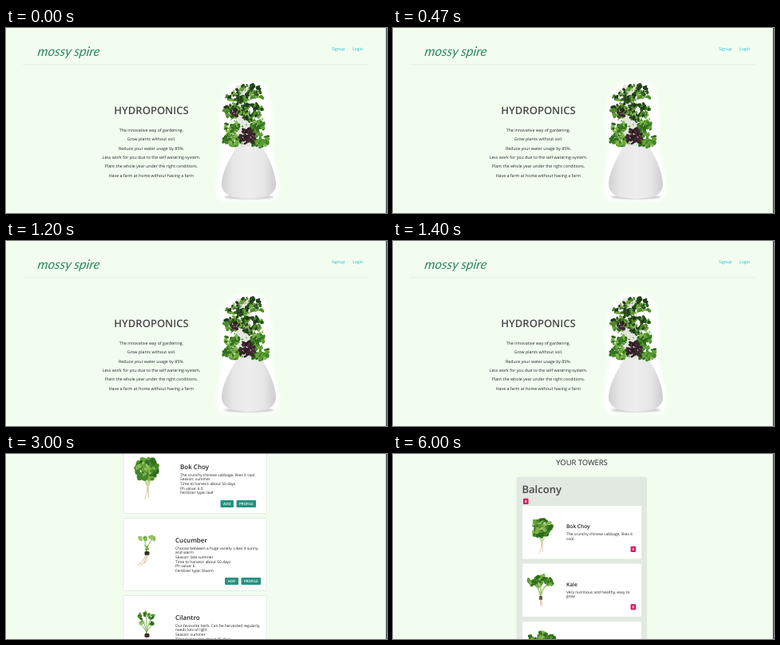
Write an HTML page that moves like this. It is 477 by 232 pixels and loops after 8.99 s.

```html
<!DOCTYPE html>
<html lang="en">
<head>
<meta charset="utf-8">
<title>Hydroponics</title>
<style>
  html, body { margin: 0; width: 100%; height: 100%; overflow: hidden; background: #f2fdf0; }
  svg { display: block; width: 100%; height: 100%; }
  text { font-family: "Open Sans", "Noto Sans", sans-serif; text-rendering: geometricPrecision; }
  .logo { font: italic 400 16.4px Lato, sans-serif; }
</style>
</head>
<body>
<svg id="stage" viewBox="0 0 477 232" preserveAspectRatio="none"></svg>
<script>
const LOOP = 8990;
const SCREEN_STARTS = [0, 3000, 6000];
const GREENS = ["#2f6b1c", "#44862a", "#62a136", "#7fb54a", "#33701f"];
const DEEP = ["#24481a", "#345f22", "#4d8a2c", "#6fa53e", "#1f3a18"];
const PALE = ["#9cc66b", "#79b04a", "#5b9437", "#8abb58"];
const PURPLES = ["#2e1a26", "#46243a", "#3a2a2a"];

let seed = 11;
function random() {
  seed = (seed * 1664525 + 1013904223) % 4294967296;
  return seed / 4294967296;
}

function text(x, y, size, content, { fill = "#222", weight = 400, anchor = "start" } = {}) {
  return `<text x="${x}" y="${y}" font-size="${size}" fill="${fill}" font-weight="${weight}" text-anchor="${anchor}">${content}</text>`;
}

function rect(x, y, w, h, fill, extra = "") {
  return `<rect x="${x}" y="${y}" width="${w}" height="${h}" fill="${fill}" ${extra}/>`;
}

function stroke(d, color, width) {
  return `<path d="${d}" fill="none" stroke="${color}" stroke-width="${width}" stroke-linecap="round"/>`;
}

function lines(x, y, size, step, rows, style) {
  return rows.map((row, i) => text(x, y + i * step, size, row, style)).join("");
}

// Leaves scattered evenly over an ellipse
function foliage(cx, cy, rx, ry, count, size, colors) {
  let out = "";
  for (let i = 0; i < count; i++) {
    const angle = random() * Math.PI * 2;
    const radius = Math.sqrt(random());
    const x = (cx + Math.cos(angle) * radius * rx).toFixed(1);
    const y = (cy + Math.sin(angle) * radius * ry).toFixed(1);
    const length = size * (0.7 + random() * 0.6);
    const color = colors[Math.floor(random() * colors.length)];
    out += `<ellipse cx="${x}" cy="${y}" rx="${length.toFixed(1)}" ry="${(length * 0.6).toFixed(1)}"
      fill="${color}" transform="rotate(${Math.round(random() * 180)} ${x} ${y})"/>`;
  }
  return out;
}

function bokChoy(x, y, scale) {
  return `<g transform="translate(${x} ${y}) scale(${scale})">`
    + stroke("M0 27Q-3 33-4 36M0 27Q2 32 1 35", "#cfb48c", 0.7)
    + stroke("M-6 6L-1 19M6 6L1 19M0 6V24", "#c5dda0", 2.4)
    + stroke("M0 17V27", "#ddd3ad", 3)
    + foliage(-1, -1, 14, 12, 60, 4.4, GREENS)
    + foliage(-2, -3, 11, 8, 12, 2.4, PALE) + "</g>";
}

function cucumber(x, y) {
  return `<g transform="translate(${x} ${y})">`
    + stroke("M0 19Q-1 8-3 3M0 18Q2 8 7 3", "#8ab45c", 1)
    + foliage(-5, 2, 5, 2, 7, 3, PALE) + foliage(7, 1, 4, 1.5, 6, 2.8, PALE)
    + foliage(1, 13, 3, 3, 4, 1.8, PALE)
    + rect(-2.5, 18, 6, 5, "#3b2d23", 'rx="1.5"')
    + stroke("M-1 23Q-4 32-11 35M0 23Q-2 34-8 36M1 23Q1 30-3 33", "#d8bd98", 0.9) + "</g>";
}

function cilantro(x, y) {
  return `<g transform="translate(${x} ${y})">`
    + stroke("M0 27Q-2 12-7 6M0 27Q2 12 7 5M0 27V3M0 24L-7 14M0 24L8 14", "#78a850", 0.9)
    + foliage(-6, 5, 4, 3, 8, 2.2, GREENS) + foliage(6, 4, 4, 3, 8, 2.2, GREENS)
    + foliage(0, 2, 3, 3, 6, 2, GREENS) + foliage(-6, 14, 3, 2, 6, 2, PALE)
    + foliage(7, 14, 3, 2, 6, 2, GREENS)
    + rect(-2.5, 26, 6, 5, "#3b2d23", 'rx="1.5"')
    + stroke("M0 31L-2 38M1 31L2 38", "#d8bd98", 0.9) + "</g>";
}

function kale(x, y) {
  return `<g transform="translate(${x} ${y})">`
    + stroke("M0 21Q-3 8-11 2M0 21Q2 8 11 4M0 22V2", "#9dc878", 1.5)
    + foliage(-9, 2, 7, 4, 18, 3, GREENS) + foliage(9, 3, 7, 4, 18, 3, GREENS)
    + foliage(0, -1, 7, 4, 15, 3, GREENS) + foliage(0, 7, 6, 3, 7, 2.2, PALE)
    + rect(-2, 20, 4, 5, "#6d5640", 'rx="1"')
    + stroke("M0 25Q-1 29 0 33M0 25L2 31", "#cfb48c", 0.9) + "</g>";
}

function vase() {
  return `<g filter="url(#glow)">`
    + `<path d="M286 68Q322 62 328 80Q336 110 332 150L342 195Q343 216 330 217H272Q262 214 264 192L271 150Q262 110 273 82Z" fill="#fff"/></g>`
    + `<ellipse cx="304" cy="212" rx="31" ry="2.6" fill="#c3c7c3" filter="url(#shade)"/>`
    + rect(288, 72, 18, 76, "#e3e6de")
    + `<path d="M289 148C284 158 271 176 270 196Q270 207 284 212Q304 216 324 212Q338 207 338 196C337 176 326 158 320 148Z" fill="url(#porcelain)"/>`
    + foliage(305, 77, 16, 6, 36, 2.6, DEEP)
    + foliage(298, 87, 23, 6, 50, 2.6, DEEP)
    + foliage(285, 104, 12, 9, 48, 2.7, DEEP)
    + foliage(307, 105, 14, 12, 64, 2.7, DEEP)
    + foliage(283, 124, 9, 8, 36, 2.7, GREENS)
    + foliage(315, 125, 9, 10, 44, 2.7, GREENS)
    + foliage(284, 140, 12, 8, 50, 2.7, GREENS)
    + foliage(318, 141, 12, 8, 50, 2.7, GREENS)
    + foliage(300, 85, 18, 10, 18, 1.6, PALE)
    + foliage(300, 122, 24, 24, 36, 1.6, PALE)
    + foliage(287, 108, 7, 5, 12, 2, PURPLES)
    + foliage(302, 136, 10, 10, 44, 2.5, PURPLES);
}

function landingScreen() {
  const link = { fill: "#10b5d8" };
  return `<text class="logo" fill="#2b8a60" transform="translate(39 34.5) skewX(-9)">mossy spire</text>`
    + text(408, 28.2, 5.1, "Signup", link) + text(434, 28.2, 5.1, "Login", link)
    + rect(21, 45.5, 432, 1, "#e5f0e4")
    + text(182, 108.3, 13, "HYDROPONICS", { fill: "#484848", weight: 600, anchor: "middle" })
    + lines(182, 129.9, 5.25, 11.35, [
      "The innovative way of gardening.",
      "Grow plants without soil.",
      "Reduce your water usage by 85%.",
      "Less work for you due to the self watering-system.",
      "Plant the whole year under the right conditions.",
      "Have a farm at home without having a farm"
    ], { anchor: "middle" })
    + vase();
}

function button(x, y, width, label) {
  return rect(x, y, width, 9, "#26927f", 'rx="1"')
    + text(x + width / 2, y + 6.1, 4.4, label, { fill: "#fff", weight: 600, anchor: "middle" });
}

function plantCard(top, height, x, title, rows) {
  return rect(147, top, 179, height, "#fff", 'stroke="#dfe9de" stroke-width=".8" rx="1"')
    + text(x, top + 30, 8, title, { weight: 600 })
    + lines(x, top + 39.2, 4.85, 5.65, rows);
}

function catalogScreen() {
  return plantCard(-11.5, 86, 218, "Bok Choy", [
      "The crunchy chinese cabbage, likes it cool.", "Season: summer",
      "Time to harvest: about 50 days", "Ph value: 6.5", "Fertilizer type: leaf"])
    + button(268.5, 58, 16.5, "ADD") + button(288.5, 58, 24.5, "PROFILE")
    + bokChoy(177.5, 20, 1)
    + plantCard(80.5, 91, 212, "Cucumber", [
      "Choose between a huge variety. Likes it sunny", "and warm", "Season: late summer",
      "Time to harvest: about 50 days", "Ph value: 6", "Fertilizer type: bloom"])
    + button(274, 155, 17, "ADD") + button(294.5, 155, 24.5, "PROFILE")
    + cucumber(176, 104)
    + plantCard(177.5, 91, 212, "Cilantro", [
      "Our favourite herb. Can be harvested regularly,", "needs lots of light",
      "Season: summer", "Time to harvest: about 25 days"])
    + cilantro(176, 199);
}

function badge(x, y) {
  return rect(x, y, 6.6, 7.2, "#dc1a63", 'rx="1.2"')
    + rect(x + 2.3, y + 2, 2, 3.2, "#f6c3d6", 'rx=".4"');
}

function towerCard(top, title, rows) {
  return rect(162, top, 149, 66.5, "#fff", 'rx="1"')
    + text(217, top + 28.4, 6.6, title, { weight: 600 })
    + lines(217, top + 37, 4.85, 5.6, rows)
    + badge(297.5, top + 50.7);
}

function towersScreen() {
  return text(236.5, 14.2, 9.4, "YOUR TOWERS", { anchor: "middle" })
    + rect(154.5, 28.5, 163.5, 220, "#e1e9e1", 'rx="4"')
    + text(161.5, 48.8, 13, "Balcony", { fill: "#484848", weight: 600 })
    + badge(163, 55.7)
    + towerCard(65, "Bok Choy", ["The crunchy chinese cabbage, likes it", "cool."])
    + bokChoy(186.5, 93, 0.86)
    + towerCard(137.6, "Kale", ["Very nutritious and healthy, easy to", "grow"])
    + kale(185, 158)
    + towerCard(210.2, "", [])
    + kale(186, 229);
}

const stage = document.getElementById("stage");
stage.innerHTML = `<defs>
  <linearGradient id="porcelain">
    <stop offset="0" stop-color="#cfd0cf"/><stop offset=".2" stop-color="#e6e6e6"/>
    <stop offset=".5" stop-color="#eeeeee"/><stop offset=".78" stop-color="#e6e6e6"/>
    <stop offset="1" stop-color="#cccdcc"/>
  </linearGradient>
  <filter id="glow"><feGaussianBlur stdDeviation="2"/></filter>
  <filter id="shade"><feGaussianBlur stdDeviation="1"/></filter>
</defs>`
  + [landingScreen(), catalogScreen(), towersScreen()].map(s => `<g class="screen">${s}</g>`).join("")
  + rect(475.7, 0, 1.3, 232, "#34434a");

const screens = [...stage.querySelectorAll(".screen")];

function draw() {
  const time = performance.now() % LOOP;
  const current = SCREEN_STARTS.filter(start => start <= time).length - 1;
  screens.forEach((screen, i) => { screen.style.display = i === current ? "" : "none"; });
  requestAnimationFrame(draw);
}
draw();
</script>
</body>
</html>
```
